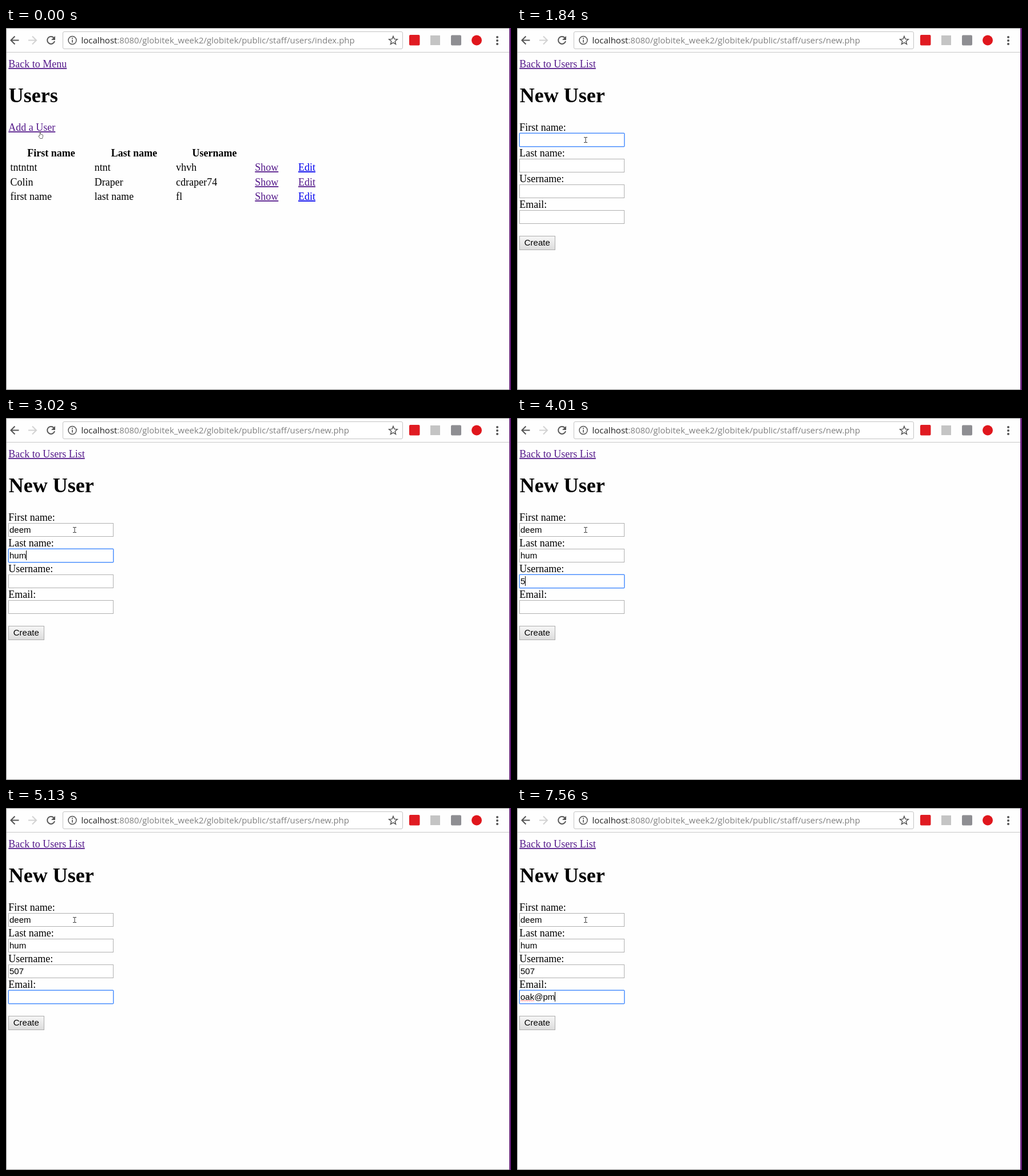
Recreate the animation shown at these times as an HTML page. Size 883 px wide and 634 px high, loop 8 s.

```html
<!DOCTYPE html>
<html lang="en">
<head>
<meta charset="utf-8">
<title>New User</title>
<style>
html, body { margin: 0; width: 100%; height: 100%; overflow: hidden; background: #fefefe; }
svg { display: block; }
text { font: 18px "Liberation Serif", serif; white-space: pre; }
.h1 { font-size: 36px; font-weight: bold; }
.th { font-weight: bold; text-anchor: middle; }
.a { fill: #551a8b; text-decoration: underline 1px; text-underline-offset: 1px; text-decoration-skip-ink: none; }
.new { fill: #00e; }
.in { font: 15px "Liberation Sans", sans-serif; }
.url { font: 15px "Open Sans", sans-serif; fill: #808080; }
.hint { font: bold 13.7px "Open Sans", sans-serif; }
.line { fill: none; stroke: #555; stroke-width: 2; }
</style>
</head>
<body>
<svg width="883" height="634" viewBox="0 0 883 634">
  <defs>
    <linearGradient id="face" x2="0" y2="1">
      <stop offset="0" stop-color="#f6f6f6"/><stop offset="1" stop-color="#dcdcdc"/>
    </linearGradient>
  </defs>

  <!-- browser frame and toolbar -->
  <path d="M0 .5H883M.5 0V634M0 633.5H883" stroke="#8a8a8a"/>
  <rect x="880" width="3" height="634" fill="#68217a"/>
  <path d="M1 42.5H880" stroke="#c8c8c8"/>
  <rect x="99.5" y="6.5" width="594" height="30" rx="2.5" fill="#fff" stroke="#c4c4c4"/>
  <path class="line" d="M22.5 21.5H9M15.5 14.5L8.5 21.5L15.5 28.5"/>
  <path class="line" d="M39 21.5H52.5M46 14.5L53 21.5L46 28.5" style="stroke:#d2d2d2"/>
  <path class="line" d="M83.5 17A6.5 6.5 0 1 0 85 23"/>
  <path d="M86 14V21H79Z" fill="#555"/>
  <circle class="line" cx="116" cy="21.5" r="7" style="stroke-width:1.5"/>
  <path d="M116 17V19M116 20.5V25.5" stroke="#555" stroke-width="1.7"/>
  <text class="url" x="131.5" y="27"><tspan fill="#222">localhost</tspan>:8080/globitek_week2/globitek/public/staff/users/<tspan id="page"></tspan></text>
  <path class="line" style="stroke-width:1.5" d="M677 14.5L679 19.4L684.3 19.8L680.2 23.2L681.5 28.4L677 25.6L672.5 28.4L673.8 23.2L669.7 19.8L675 19.4Z"/>
  <rect x="705" y="12" width="18.5" height="18.5" rx="2" fill="#e01b22"/>
  <rect x="742" y="13" width="17" height="17" fill="#c4c4c4"/>
  <rect x="778" y="12.5" width="18" height="18" rx="2" fill="#8e8e92"/>
  <circle cx="823" cy="21.5" r="9" fill="#e0161c"/>
  <g fill="#555"><circle cx="859" cy="16" r="2"/><circle cx="859" cy="22" r="2"/><circle cx="859" cy="28" r="2"/></g>

  <g id="list">
    <text class="a" x="4.3" y="69">Back to Menu</text>
    <text class="h1" x="4.8" y="130">Users</text>
    <text class="a" id="add" x="4.3" y="180">Add a User</text>
    <text class="th" x="79" y="225">First name</text>
    <text class="th" x="224" y="225">Last name</text>
    <text class="th" x="364.5" y="225">Username</text>
    <g id="rows"></g>
    <path d="M59 181.5Q60.3 181 60.5 183V186L64 187Q65 187.5 64.5 190L63.5 193.5H59.5L56.8 189.5Q57 188 59 189V181.5Z" fill="#fff" stroke="#444" stroke-width=".8"/>
  </g>

  <g id="form">
    <text class="a" x="4.3" y="69">Back to Users List</text>
    <text class="h1" x="4.8" y="130">New User</text>
    <g id="fields"></g>
    <rect x="4.5" y="364.5" width="62" height="24" fill="url(#face)" stroke="#adadad"/>
    <text class="in" x="12.75" y="381">Create</text>
    <rect id="ring" x="4.25" width="183.5" height="23.5" rx="1" fill="none" stroke="#4d90fe" stroke-width="1.5"/>
    <path id="caret" stroke="#000"/>
    <path id="wave" d="M6 338L8 337L10 338L12 337L14 338L16 337L18 338L20 337L22 338L24 337L26 338L28 337L30 338" fill="none" stroke="#ff7777"/>
    <g id="drop">
      <rect x="4.5" y="298.5" width="183" height="55" fill="#fff" stroke="#b4b4b4"/>
      <text class="hint" x="14.3" y="316">50749216</text>
      <text class="hint" x="14.3" y="343">5074921</text>
    </g>
    <path id="arrow" d="M62.5 181L69 187M66 187V190.5" stroke="#777" fill="none"/>
    <path id="beam" d="M-3 -4.5H-.8L0 -4L.8 -4.5H3M0 -4V4M-3 4.5H-.8L0 4L.8 4.5H3" stroke="#333" fill="none"/>
  </g>
</svg>
<script>
const $ = id => document.getElementById(id);
const label = (x, y, s, cls = '') => `<text class="${cls}" x="${x}" y="${y}">${s}</text>`;

$('rows').innerHTML = [
  ['tntntnt', 'ntnt', 'vhvh'],
  ['Colin', 'Draper', 'cdraper74'],
  ['first name', 'last name', 'fl']
].map((row, i) => {
  const y = Math.round(250 + 25.5 * i);
  return row.map((s, c) => label([7.5, 154.7, 297.3][c], y, s)).join('')
    + label(435.3, y, 'Show', 'a') + label(511, y, 'Edit', i === 1 ? 'a' : 'a new');
}).join('');

$('fields').innerHTML = ['First name:', 'Last name:', 'Username:', 'Email:'].map((s, i) =>
  label(4.3, 180 + 45 * i, s)
  + `<rect x="4.5" y="${184.5 + 45 * i}" width="183" height="23" fill="#fff" stroke="#b0b0b0"/>`
  + label(6, 201 + 45 * i, '', 'in value')).join('');
const values = document.querySelectorAll('.value');

// time, focused field, its text, caret shown
const typing = [
  [1310, 0, '', 1], [1840, 0, '', 0], [1980, 0, 'd', 1], [2110, 0, 'dee', 1], [2260, 0, 'deem', 1],
  [2400, 1, '', 1], [2650, 1, 'h', 1], [2900, 1, 'hu', 1], [3020, 1, 'hum', 1],
  [3450, 2, '', 1], [4010, 2, '5', 1], [4280, 2, '507', 1],
  [4550, 3, '', 1], [5130, 3, '', 0], [5530, 3, '', 1], [6090, 3, '', 0],
  [6530, 3, 'o', 1], [6670, 3, 'oak', 1], [7040, 3, 'oak@', 1], [7440, 3, 'oak@p', 1], [7560, 3, 'oak@pm', 1]
];
// time, x, y of the text pointer
const pointer = [[630, 88, 188], [760, 113, 190], [880, 133, 191], [1030, 120, 196]];

const show = (id, on) => $(id).style.display = on ? '' : 'none';
const latest = (steps, t) => steps.filter(s => s[0] <= t).pop();

function draw(t) {
  const onForm = t >= 510;
  show('list', !onForm);
  show('form', onForm);
  $('page').textContent = onForm ? 'new.php' : 'index.php';
  $('add').style.fill = t >= 270 ? '#e00' : '';

  const spot = latest(pointer, t);
  show('arrow', !spot);
  show('beam', spot);
  if (spot) $('beam').setAttribute('transform', `translate(${spot[1]} ${spot[2]})`);

  values.forEach((v, i) => {
    const step = latest(typing.filter(s => s[1] === i), t);
    v.textContent = step ? step[2] : '';
  });
  const now = latest(typing, t);
  show('ring', now);
  show('caret', now && now[3]);
  show('drop', t >= 4130 && t < 4550);
  show('wave', t >= 7040);
  if (now) {
    const top = 45 * now[1];
    const x = Math.round(6 + (now[2] ? values[now[1]].getComputedTextLength() : 0)) + .5;
    $('ring').setAttribute('y', 184.25 + top);
    $('caret').setAttribute('d', `M${x} ${187 + top}v17`);
  }
}

const start = performance.now();
function tick() {
  draw((performance.now() - start) % 8000);
  requestAnimationFrame(tick);
}
tick();
</script>
</body>
</html>
```
